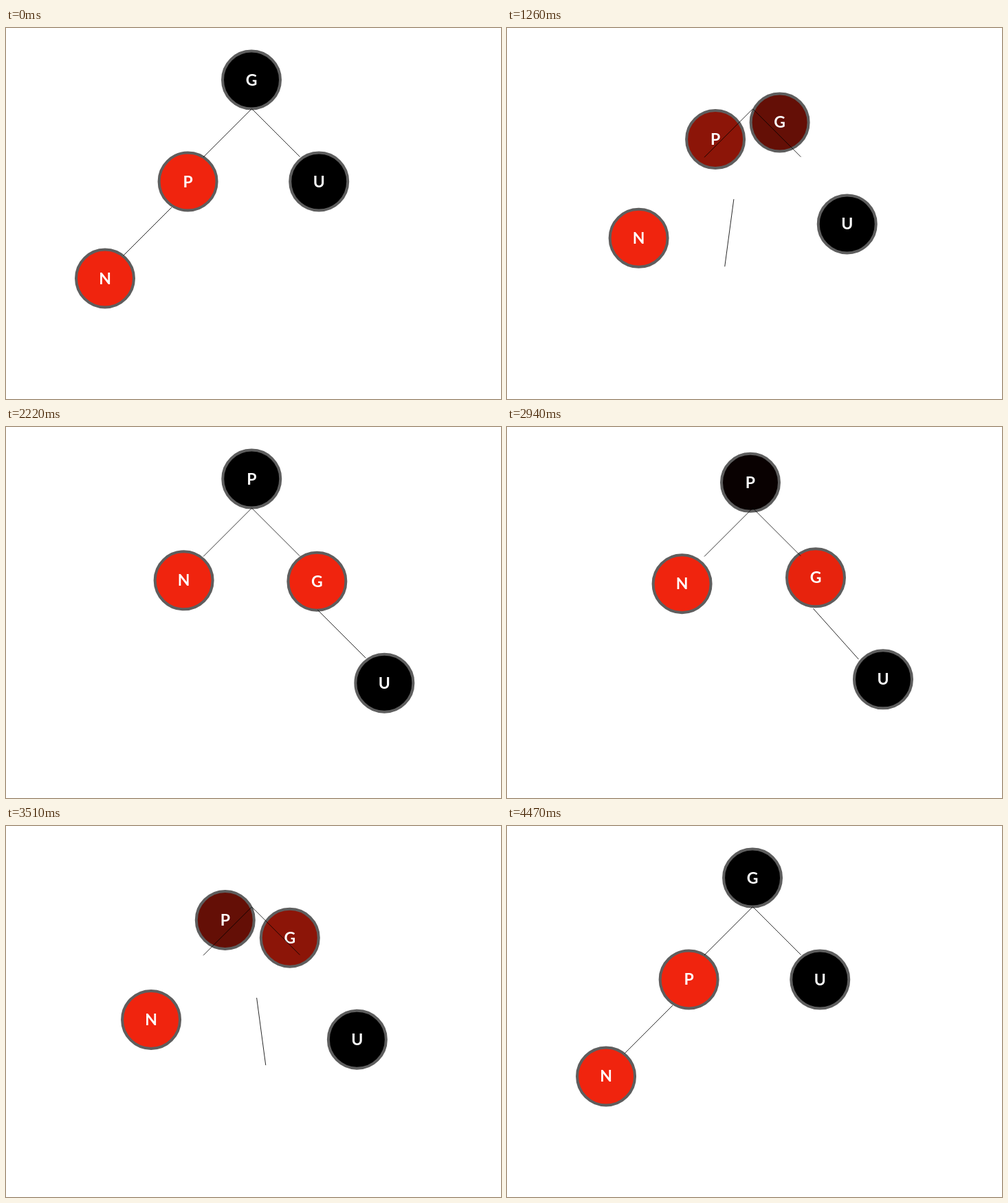
An HTML page for the animation above (4.5 s loop, 720 px wide and 540 px high).

```html
<!DOCTYPE html>
<html lang="en">
<head>
<meta charset="utf-8">
<title>Tree rotation</title>
<style>
  html, body { margin: 0; width: 100%; height: 100%; overflow: hidden; background: #fff; }
  svg { display: block; width: 720px; height: 540px; }
  circle { stroke: #5e5e5e; stroke-width: 4; }
  line { stroke: #000; stroke-width: .8; }
  text { fill: #fff; font: 700 23px Lato, "Open Sans", sans-serif; text-anchor: middle; }
</style>
</head>
<body>
<svg id="stage" viewBox="0 0 720 540"></svg>
<script>
const LOOP = 4500, HOLD = 450, MOVE = 1800;
const RED = [240, 36, 14], BLACK = [0, 0, 0];
const stage = document.getElementById('stage');

function add(tag, attrs, parent = stage) {
  const el = document.createElementNS('http://www.w3.org/2000/svg', tag);
  set(el, attrs);
  return parent.appendChild(el);
}

function set(el, attrs) {
  for (const key in attrs) el.setAttribute(key, attrs[key]);
}

const mix = (from, to, k) => from.map((v, i) => v + (to[i] - v) * k);

// cubic-bezier(.42, 0, .58, 1)
function easeInOut(x) {
  if (x <= 0 || x >= 1) return Math.min(1, Math.max(0, x));
  let lo = 0, hi = 1;
  for (let i = 0; i < 30; i++) {
    const s = (lo + hi) / 2, r = 1 - s;
    if (3 * r * r * s * .42 + 3 * r * s * s * .58 + s ** 3 < x) lo = s; else hi = s;
  }
  return lo * lo * (3 - 2 * lo);
}

const nodes = [
  { label: 'G', from: [357, 75.5], to: [452.4, 224.7], fill: [BLACK, RED] },
  { label: 'P', from: [264.6, 223.5], to: [357.3, 75.5], fill: [RED, BLACK] },
  { label: 'U', from: [455.2, 223.5], to: [550.4, 372.7], fill: [BLACK, BLACK] },
  { label: 'N', from: [144, 364.5], to: [258.7, 223.2], fill: [RED, RED] }
];
for (const node of nodes) {
  node.group = add('g', {});
  node.disc = add('circle', { r: 42 }, node.group);
  add('text', { y: 8 }, node.group).textContent = node.label;
}

// Upper edges, as x1, y1, x2, y2 before and after the rotation.
const edges = [
  { from: [357, 118], to: [357, 118.5], span: [-70, 70] },
  { from: [357.5, 117.5], to: [357.2, 117.7], span: [70, 70] }
];
for (const edge of edges) edge.el = add('line', {});

const swing = add('line', { y1: -49.5, y2: 49.5 });

function draw(time) {
  const t = time % LOOP;
  const half = LOOP / 2;
  const eased = easeInOut((t % half - HOLD) / MOVE);
  const k = t < half ? eased : 1 - eased;

  for (const { from, to, fill, group, disc } of nodes) {
    set(group, { transform: `translate(${mix(from, to, k)})` });
    set(disc, { fill: `rgb(${mix(...fill, k).map(Math.round)})` });
  }
  for (const { from, to, span, el } of edges) {
    const [x1, y1] = mix(from, to, k);
    set(el, { x1, y1, x2: x1 + span[0], y2: y1 + span[1] });
  }
  const centre = mix([206, 296], [488.5, 301.3], k);
  set(swing, { transform: `translate(${centre}) rotate(${45 - 90 * k})` });
}

const start = performance.now();
function tick() {
  draw(performance.now() - start);
  requestAnimationFrame(tick);
}
tick();
</script>
</body>
</html>
```
